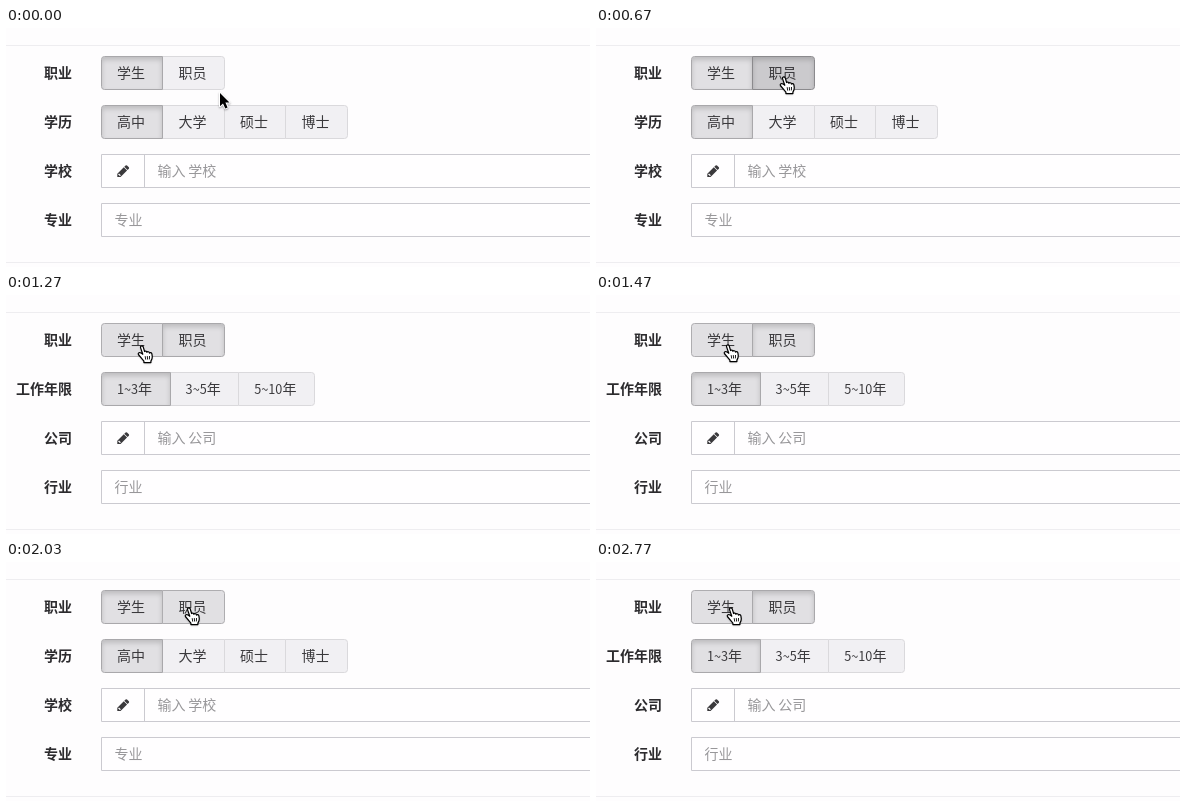
Write an HTML page with a canvas that moves like this. It is 584 px wide and 239 px high and loops after 2860 ms.

```html
<!DOCTYPE html>
<html lang="zh-CN">
<head>
<meta charset="utf-8">
<title>Form toggle</title>
<style>
html, body { margin: 0; width: 100%; height: 100%; overflow: hidden; background: #fefdfe; }
canvas { display: block; width: 584px; height: 239px; }
</style>
</head>
<body>
<canvas id="stage"></canvas>
<script>
const W = 584, H = 239, LOOP = 2860, LEFT = 95, ROW = 34;
const canvas = document.getElementById('stage');
const ctx = canvas.getContext('2d');
const dpr = window.devicePixelRatio || 1;
canvas.width = W * dpr;
canvas.height = H * dpr;

const FAMILY = '"Noto Sans CJK SC", "Noto Sans CJK", "Noto Sans", sans-serif';
const FORMS = {
  student: {
    labels: ['职业', '学历', '学校', '专业'],
    options: ['高中', '大学', '硕士', '博士'],
    hints: ['输入 学校', '专业']
  },
  worker: {
    labels: ['职业', '工作年限', '公司', '行业'],
    options: ['1~3年', '3~5年', '5~10年'],
    hints: ['输入 公司', '行业']
  }
};
const ROLES = ['学生', '职员'];
const ROWS = [28, 77, 126, 175];

const STYLES = {
  normal: { fill: '#f1f0f3', edge: '#dad9dc' },
  hover: { fill: '#e1e0e3', edge: '#aeadb0' },
  active: { fill: '#e1e0e3', edge: '#a9a8ab', inset: true },
  pressed: { fill: '#cbcacd', edge: '#8b8a8d', inset: true }
};

// pointer waypoints: time, x, y
const TRACK = [
  [0, 214, 65], [70, 214, 65], [370, 197, 52], [530, 188, 49],
  [970, 188, 49], [1000, 187, 49], [1270, 136, 51], [1470, 132, 50],
  [1610, 132, 50], [1770, 161, 48], [2030, 183, 46],
  [2260, 183, 46], [2300, 181, 46], [2560, 146, 48], [2700, 138, 48],
  [2770, 135, 46], [LOOP, 135, 46]
];

// mouse presses: down, up, button
const CLICKS = [[670, 800, 1], [1570, 1670, 0], [2200, 2270, 1]];

const PENCIL = new Path2D(
  'M7.5 3.25L10.75 6.5 4.25 13H1V9.75ZM3.84 12l.7-.7-1.83-1.84-.71.7V11h1v1Z' +
  'M12.55 4.7l-1.3 1.3L8 2.75l1.3-1.29q.28-.3.7-.3.41 0 .71.3l1.84 1.83q.6.7 0 1.41Z');
const ARROW = new Path2D('M0 0V13.2L3 10.4 5.3 15.4 7.6 14.4 5.4 9.5H9.5Z');
const HAND = new Path2D(
  'M4.7.8C3.6 1 3.3 2 3.6 2.9L5.8 9.3 4.1 8.1C2.6 7 .7 7.9 1.4 9.5L4.6 13.3 6.9 16.2V17.6H13.9V16.1' +
  'C14.8 14.6 15.4 13.3 15.3 11.8L14.9 8.9C14.5 7.4 13 7.2 12.5 8.1 12.2 6.5 10.4 6.3 9.9 7.3' +
  ' 9.5 5.9 8.1 5.7 7.6 6.5L6.2 1.8C5.9 1 5.3.7 4.7.8Z');
const KNUCKLES = new Path2D('M8.2 11.2L8.7 14.6M10.3 11.1L10.6 14.5M12.5 11L12.4 14.4');

function pointAt(t) {
  const i = Math.max(1, TRACK.findIndex(p => p[0] >= t));
  const [t0, x0, y0] = TRACK[i - 1], [t1, x1, y1] = TRACK[i];
  const k = Math.max(0, (t - t0) / (t1 - t0));
  return { x: x0 + (x1 - x0) * k, y: y0 + (y1 - y0) * k };
}

// Latin runs are set smaller than the Chinese ones
function textRuns(text, weight) {
  return text.match(/[ -~]+|[^ -~]+/g).map(run => {
    const font = `${weight} ${/[ -~]/.test(run) ? 12.7 : 14}px ${FAMILY}`;
    ctx.font = font;
    return { run, font, width: ctx.measureText(run).width };
  });
}

const textWidth = (text, weight = 400) =>
  textRuns(text, weight).reduce((sum, r) => sum + r.width, 0);

function drawText(text, x, y, color, weight = 400) {
  ctx.fillStyle = color;
  for (const r of textRuns(text, weight)) {
    ctx.font = r.font;
    ctx.fillText(r.run, x, y);
    x += r.width;
  }
}

function boxPath(x, y, w, h, radii) {
  ctx.beginPath();
  ctx.roundRect(x, y, w, h, radii);
}

function drawInset(x, y, w, h, radii) {
  ctx.save();
  boxPath(x, y, w, h, radii);
  ctx.clip();
  ctx.shadowColor = 'rgba(0,0,0,.16)';
  ctx.shadowBlur = 5 * dpr;
  ctx.shadowOffsetY = 3 * dpr;
  ctx.beginPath();
  ctx.rect(x - 20, y - 20, w + 40, h + 40);
  ctx.rect(x, y, w, h);
  ctx.fillStyle = '#000';
  ctx.fill('evenodd');
  ctx.restore();
}

function drawButton(b, y) {
  const s = STYLES[b.state];
  boxPath(b.x + .5, y + .5, b.w - 1, ROW - 1, b.radii);
  ctx.fillStyle = s.fill;
  ctx.fill();
  if (s.inset) drawInset(b.x + 1, y + 1, b.w - 2, ROW - 2, b.radii);
  boxPath(b.x + .5, y + .5, b.w - 1, ROW - 1, b.radii);
  ctx.strokeStyle = s.edge;
  ctx.stroke();
  drawText(b.text, b.textX, y + 22, '#3a393c');
}

function drawGroup(texts, y, stateOf) {
  let pos = LEFT;
  const buttons = texts.map((text, i) => {
    const next = pos + textWidth(text) + 33.5;
    const x = Math.round(pos), l = i ? 0 : 3, r = i < texts.length - 1 ? 0 : 3;
    const b = {
      text, x, w: Math.round(next + 1) - x, textX: pos + 16,
      radii: [l, r, r, l], state: stateOf(i)
    };
    pos = next;
    return b;
  });
  const raised = b => b.state !== 'normal';
  buttons.filter(b => !raised(b)).forEach(b => drawButton(b, y));
  buttons.filter(raised).forEach(b => drawButton(b, y));
}

function drawInput(y, hint, textX) {
  ctx.fillStyle = '#fffeff';
  ctx.fillRect(LEFT, y, W, ROW);
  ctx.strokeStyle = '#cbcad0';
  ctx.strokeRect(LEFT + .5, y + .5, W, ROW - 1);
  drawText(hint, textX, y + 22, '#98979a');
}

function drawRule(y) {
  ctx.fillStyle = '#eeedf0';
  ctx.fillRect(0, y, W, 1);
}

function drawArrow(p) {
  ctx.translate(p.x, p.y);
  ctx.save();
  ctx.shadowColor = 'rgba(0,0,0,.35)';
  ctx.shadowBlur = 2 * dpr;
  ctx.shadowOffsetY = dpr;
  ctx.strokeStyle = '#fff';
  ctx.lineWidth = 2;
  ctx.stroke(ARROW);
  ctx.restore();
  ctx.fillStyle = '#000';
  ctx.fill(ARROW);
}

function drawHand(p) {
  ctx.translate(p.x - 5, p.y - 1);
  ctx.save();
  ctx.shadowColor = 'rgba(0,0,0,.3)';
  ctx.shadowBlur = 2 * dpr;
  ctx.shadowOffsetY = dpr;
  ctx.fillStyle = '#fff';
  ctx.fill(HAND);
  ctx.restore();
  ctx.strokeStyle = '#000';
  ctx.lineWidth = 1.2;
  ctx.stroke(HAND);
  ctx.lineWidth = .9;
  ctx.stroke(KNUCKLES);
}

function draw(t) {
  ctx.setTransform(dpr, 0, 0, dpr, 0, 0);
  ctx.lineWidth = 1;
  ctx.lineJoin = 'round';
  ctx.fillStyle = '#fefdfe';
  ctx.fillRect(0, 0, W, H);

  const done = CLICKS.filter(c => t >= c[1]);
  const selected = done.length ? done[done.length - 1][2] : 0;
  const held = CLICKS.find(c => t >= c[0] && t < c[1]);
  const form = selected ? FORMS.worker : FORMS.student;

  // hover trails the pointer slightly
  const seen = pointAt(Math.max(0, t - 40));
  const inside = seen.y < 62;
  const hovered = inside ? (seen.x < 158 ? 0 : 1) : -1;

  drawRule(17);
  drawRule(234);
  form.labels.forEach((label, i) =>
    drawText(label, 66 - textWidth(label, 700), ROWS[i] + 22, '#2c2b2e', 700));

  drawGroup(ROLES, ROWS[0], i => {
    if (held && held[2] === i) return 'pressed';
    if (i === selected) return i === hovered ? 'pressed' : 'active';
    return i === hovered ? 'hover' : 'normal';
  });
  drawGroup(form.options, ROWS[1], i => i ? 'normal' : 'active');

  drawInput(ROWS[2], form.hints[0], 151.5);
  ctx.fillStyle = '#cbcad0';
  ctx.fillRect(138, ROWS[2], 1, ROW);
  ctx.save();
  ctx.translate(110.3, 136);
  ctx.fillStyle = '#3a393c';
  ctx.fill(PENCIL, 'evenodd');
  ctx.restore();
  drawInput(ROWS[3], form.hints[1], 108.5);

  const p = pointAt(t);
  const spot = { x: Math.round(p.x), y: Math.round(p.y) };
  if (inside) drawHand(spot); else drawArrow(spot);
}

const start = performance.now();
function tick() {
  draw((performance.now() - start) % LOOP);
  requestAnimationFrame(tick);
}
tick();
</script>
</body>
</html>
```
